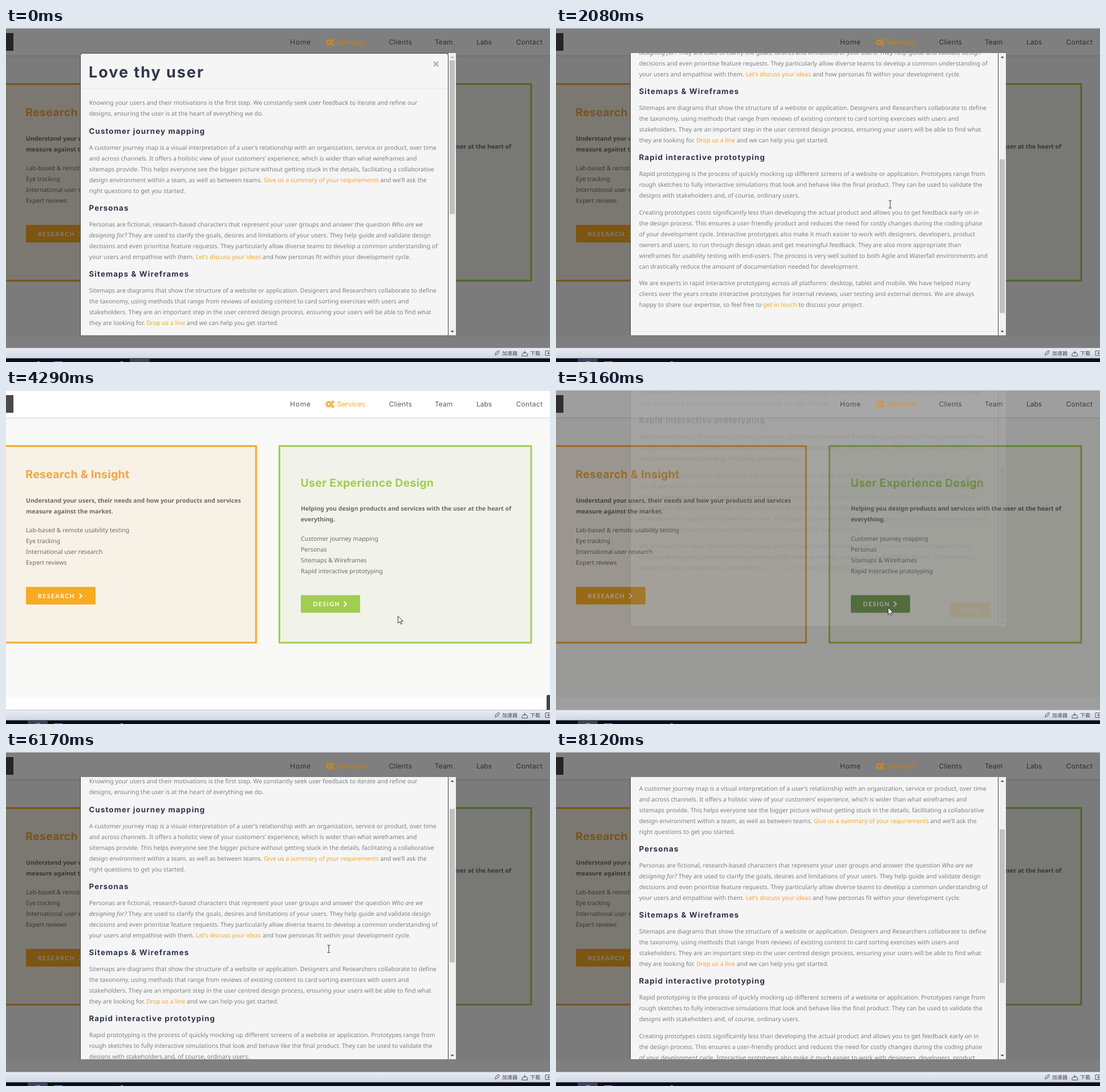
Write an HTML page that moves like this. It is 954 px wide and 587 px high and loops after 8.52 s.

```html
<!DOCTYPE html>
<html lang="en">
<head>
<meta charset="utf-8">
<title>Love thy user</title>
<style>
html, body { margin: 0; width: 100%; height: 100%; overflow: hidden; background: #f8f8f7; }
svg { display: block; width: 954px; height: 587px; }
text { font: 10.52px "Noto Sans", sans-serif; text-rendering: geometricPrecision; white-space: pre; }
.nav { font: 12px Inter, sans-serif; fill: #5c5c5c; }
.card { font: 700 19.5px Inter, sans-serif; letter-spacing: .28px; }
.copy { fill: #6b6b6b; }
.bold { font-weight: 700; }
.btn { font: 700 10.5px Lato, sans-serif; letter-spacing: 1.45px; fill: #fff; }
.h1 { font: 700 27px Inter, sans-serif; letter-spacing: 1.95px; fill: #30374a; }
.h2 { font: 700 13.4px Inter, sans-serif; letter-spacing: 1.08px; fill: #2e3548; }
.body { fill: #7a8087; }
.link { fill: #f5a623; }
.em { font-style: italic; }
.tool { font: 9px "Noto Sans CJK SC", "Noto Sans CJK", sans-serif; fill: #444; }
.chev { fill: none; stroke: #fff; stroke-width: 2; }
</style>
</head>
<body>
<svg viewBox="0 0 954 587">
  <defs>
    <clipPath id="view"><rect y="1" width="954" height="561"/></clipPath>
    <clipPath id="pane"><rect x="130" y="44" width="659" height="496"/></clipPath>
    <linearGradient id="bar" x2="0" y2="1">
      <stop stop-color="#e9edf4"/><stop offset="1" stop-color="#d0d7e4"/>
    </linearGradient>
  </defs>
  <rect width="954" height="587" fill="#cfd5e3"/>
  <g clip-path="url(#view)">
    <rect y="1" width="954" height="561" fill="#f8f8f7"/>
    <rect y="541" width="954" height="21" fill="#fff"/>
    <rect y="48" width="954" height="3" fill="#000" opacity=".035"/>
    <rect y="1" width="954" height="47" fill="#fff"/>
    <rect y="48" width="954" height="1" fill="#e2e2e2"/>
    <rect x="-18" y="9" width="31" height="31" fill="#4a4a4a"/>
    <rect x="-6" y="98.5" width="444.5" height="345.5" fill="#f8f1e6" stroke="#f5a833" stroke-width="3"/>
    <rect x="479.5" y="98.5" width="441.5" height="345.5" fill="#f1f3ea" stroke="#a0ce4e" stroke-width="3"/>
    <rect x="35" y="346" width="122" height="31" rx="1.5" fill="#f7ab23"/>
    <rect id="design" x="517" y="360.5" width="104" height="31" rx="1.5"/>
    <path class="chev" d="M128.5 357.5l4.3 4.3-4.3 4.3M592.5 372l4.3 4.3-4.3 4.3"/>
    <g id="page"></g>
    <g id="active">
      <g fill="none" stroke="#f5a833">
        <circle cx="566" cy="25" r="3.4" stroke-width="2.6"/>
        <circle cx="566" cy="25" r="5.2" stroke-width="1.6" stroke-dasharray="2.1 1.98"/>
        <circle cx="573" cy="21.3" r="1.8" stroke-width="1.8"/>
        <circle cx="573" cy="28.7" r="1.8" stroke-width="1.8"/>
      </g>
    </g>
    <path id="top" d="M954 536h-4q-2 0-2 2v24h6z" fill="#444"/>
    <rect id="shade" y="1" width="954" height="561"/>
    <use id="glow" href="#active" opacity=".65"/>
    <g id="modal">
      <g clip-path="url(#pane)">
        <g id="content">
          <rect x="130.5" y="44.5" width="645" height="866" rx="4" fill="#f5f5f5" stroke="#454545"/>
          <path d="M131 106.5h644M131 854.5h644" stroke="#e6e6e6"/>
          <path d="M750.3 59.3l8 8m0-8l-8 8" stroke="#b5b5b5" stroke-width="2.8"/>
          <rect x="690.5" y="868" width="70.5" height="28" rx="1.5" fill="#f7ab23"/>
        </g>
        <rect x="776" y="44" width="13" height="496" fill="#f1f1f1"/>
        <rect id="thumb" x="778" y="57" width="9" height="270" fill="#c1c1c1"/>
        <path id="up" d="M779.7 52.5h6l-3-3z"/>
        <path d="M779.7 532h6l-3 3z" fill="#404040"/>
      </g>
    </g>
  </g>
  <rect y="562" width="954" height="18.5" fill="url(#bar)"/>
  <rect y="562" width="954" height="1" fill="#b9bfce"/>
  <g fill="none" stroke="#555">
    <path d="M858 573q1-5 7-6q0 6-5 7zM857 576l3-3M861 570l2 2"/>
    <path d="M905 573v3.500h9.500v-3.500l-2-2h-5.500zM909.700 567v5m-2-2l2 2 2-2"/>
    <path d="M954 567.500h-8v8h8M949 571.500h5m-2.500-2.500v5"/>
  </g>
  <text class="tool" x="870" y="575">加速器</text>
  <text class="tool" x="919" y="575">下载</text>
  <rect y="580.5" width="954" height="6.500" fill="#090d18"/>
  <rect id="task" y="580.5" width="35" height="6.500" fill="#3d4150"/>
  <ellipse id="dot" cx="56" cy="588" rx="6" ry="3" fill="#6b55a8"/>
  <rect x="84" y="586" width="15" height="1" fill="#d98a1f"/>
  <path d="M55 586.500h4M201 586.500h4" stroke="#bbb"/>
  <g id="cursor" stroke-linejoin="round">
    <path id="arrow" d="M.5 .5v12.200l2.900-2.700 2 4.500 2-.9-2-4.300h3.900z" fill="#fff" stroke="#222" stroke-width=".9"/>
    <path id="beam" d="M-2.500 -6.500h2l.5.500.5-.5h2M0-6v12M-2.500 6.500h2l.5-.5.5.5h2" fill="none" stroke="#333"/>
    <path id="hand" d="M-1 8V1q1-2 2 0v5l5 1q2 .5 2 2.500v3l-1.500 4h-6l-4.500-6.500q0-2 1.500-1z" fill="#fff" stroke="#222" stroke-width=".9"/>
  </g>
</svg>
<script>
const LOOP = 8520, MAX = 371, SLIDE = 124;
const $ = id => document.getElementById(id);
const set = (id, k, v) => $(id).setAttribute(k, v);
const show = (id, on) => set(id, 'visibility', on ? 'visible' : 'hidden');
const clamp = p => Math.min(1, Math.max(0, p));

// *link* and _emphasis_ become spans
function put(box, cls, x, y, str, color) {
  const node = (name, c, s) => {
    const n = document.createElementNS('http://www.w3.org/2000/svg', name);
    if (c) n.setAttribute('class', c);
    n.textContent = s;
    return n;
  };
  const el = node('text', cls, '');
  el.setAttribute('x', x);
  el.setAttribute('y', y);
  if (color) el.style.fill = color;
  for (const part of str.split(/(\*[^*]+\*|_[^_]+_)/)) {
    if (!part) continue;
    const c = part[0] === '*' ? 'link' : part[0] === '_' ? 'em' : '';
    el.append(c ? node('tspan', c, part.slice(1, -1)) : part);
  }
  $(box).append(el);
  return el;
}
const rows = (box, cls, x, y, str) =>
  str.split('\n').forEach((s, i) => put(box, cls, x, y + i * 19, s));

const nav = (box, x, label, gap, color) =>
  put(box, 'nav', x, 29.3, label, color).style.letterSpacing = gap + 'px';
nav('page', 498, 'Home', .8);
nav('active', 580.5, 'Services', 0, '#f5a833');
nav('page', 671.5, 'Clients', .25);
nav('page', 752, 'Team', 0);
nav('page', 825, 'Labs', 0);
nav('page', 894.5, 'Contact', .3);

put('page', 'card', 34.3, 155, 'Research & Insight', '#f0a93a');
put('page', 'card', 516.5, 169.7, 'User Experience Design', '#a0ce4e');
put('page', 'btn', 56, 365.8, 'RESEARCH');
put('page', 'btn', 538.5, 380.3, 'DESIGN');
rows('page', 'copy bold', 35, 197.5, `Understand your users, their needs and how your products and services
measure against the market.`);
rows('page', 'copy', 35, 250, `Lab-based & remote usability testing
Eye tracking
International user research
Expert reviews`);
rows('page', 'copy bold', 517, 212, `Helping you design products and services with the user at the heart of
everything.`);
rows('page', 'copy', 517, 264.7, `Customer journey mapping
Personas
Sitemaps & Wireframes
Rapid interactive prototyping`);

const para = (y, str) => rows('content', 'body', 145.7, y, str);
const head = (y, str) => put('content', 'h2', 145.5, y, str);
put('content', 'h1', 145, 87, 'Love thy user');
para(135.3, `Knowing your users and their motivations is the first step. We constantly seek user feedback to iterate and refine our
designs, ensuring the user is at the heart of everything we do.`);
head(185.5, 'Customer journey mapping');
para(213.7, `A customer journey map is a visual interpretation of a user’s relationship with an organization, service or product, over time
and across channels. It offers a holistic view of your customers’ experience, which is wider than what wireframes and
sitemaps provide. This helps everyone see the bigger picture without getting stuck in the details, facilitating a collaborative
design environment within a team, as well as between teams. *Give us a summary of your requirements* and we’ll ask the
right questions to get you started.`);
head(320.5, 'Personas');
para(348.7, `Personas are fictional, research-based characters that represent your user groups and answer the question _Who are we_
_designing for?_ They are used to clarify the goals, desires and limitations of your users. They help guide and validate design
decisions and even prioritise feature requests. They particularly allow diverse teams to develop a common understanding of
your users and empathise with them. *Let’s discuss your ideas* and how personas fit within your development cycle.`);
head(437, 'Sitemaps & Wireframes');
para(465, `Sitemaps are diagrams that show the structure of a website or application. Designers and Researchers collaborate to define
the taxonomy, using methods that range from reviews of existing content to card sorting exercises with users and
stakeholders. They are an important step in the user centred design process, ensuring your users will be able to find what
they are looking for. *Drop us a line* and we can help you get started.`);
head(553.3, 'Rapid interactive prototyping');
para(581.3, `Rapid prototyping is the process of quickly mocking up different screens of a website or application. Prototypes range from
rough sketches to fully interactive simulations that look and behave like the final product. They can be used to validate the
designs with stakeholders and, of course, ordinary users.`);
para(648.7, `Creating prototypes costs significantly less than developing the actual product and allows you to get feedback early on in
the design process. This ensures a user-friendly product and reduces the need for costly changes during the coding phase
of your development cycle. Interactive prototypes also make it much easier to work with designers, developers, product
owners and users, to run through design ideas and get meaningful feedback. They are also more appropriate than
wireframes for usability testing with end-users. The process is very well suited to both Agile and Waterfall environments and
can drastically reduce the amount of documentation needed for development.`);
para(773, `We are experts in rapid interactive prototyping across all platforms: desktop, tablet and mobile. We have helped many
clients over the years create interactive prototypes for internal reviews, user testing and external demos. We are always
happy to share our expertise, so feel free to *get in touch* to discuss your project.`);
put('content', 'btn', 706.7, 885.8, 'CLOSE').style.letterSpacing = '1px';

// bursts of motion: start, end, number of picture changes
const bursts = [[70, 500, 7], [820, 920, 2], [1230, 1760, 8], [1910, 2240, 5], [2850, 3420, 8],
  [3570, 3570, 1], [3740, 4510, 11], [4600, 4760, 3], [4910, 5760, 11], [5840, 6250, 6],
  [6390, 6620, 4], [6760, 7550, 11], [7630, 8120, 7]];
const scroll = [[1150, 0], [1400, 75], [1760, 225], [1840, 225], [2075, 321], [2240, MAX],
  [5770, MAX], [6168, 80], [6250, 71], [6310, 71], [6620, 146], [6680, 146], [7000, 221],
  [7080, 221], [7400, 146]];
const pointer = [[70, 790, 516], [300, 650, 370], [500, 586, 310], [2780, 586, 310], [3180, 690, 500],
  [3260, 706, 532], [3420, 717, 508], [3740, 717, 507], [3894, 712, 500], [4279, 687, 397],
  [4510, 625, 388], [4760, 582, 382], [5250, 582, 382], [5760, 566, 346], [7080, 566, 346],
  [7550, 772, 475], [7630, 780, 480], [8120, 937, 590]];
const kinds = [[0, 'arrow'], [140, 'beam'], [3150, 'arrow'], [3330, 'hand'], [3800, 'arrow'],
  [4590, 'hand'], [4990, 'arrow'], [5440, 'beam'], [7530, 'arrow']];

function snap(t) {
  let at = 0;
  for (const [a, b, n] of bursts) {
    if (t < a) break;
    const step = (b - a) / (n - 1) || 1;
    at = Math.min(b, a + step * Math.floor((t - a) / step + .1));
  }
  return at;
}
function track(keys, t, c = 1) {
  if (t <= keys[0][0]) return keys[0][c];
  for (let i = 1; i < keys.length; i++) {
    const a = keys[i - 1], b = keys[i];
    if (t <= b[0]) return a[c] + (b[c] - a[c]) * (t - a[0]) / (b[0] - a[0]);
  }
  return keys[keys.length - 1][c];
}
const easeOut = p => 1 - Math.pow(1 - clamp(p), 1.68);

function draw(clock) {
  const t = snap(clock);
  const y = Math.round(track(scroll, t));
  const opening = t > 4800;
  const fade = clamp(opening ? (t - 5135) / 300 : 1 - (t - 3740) / 300);
  const lift = opening ? 1 - easeOut((t - 5165) / 300) : easeOut((t - 3740) / 300);
  const shade = .5 * clamp(opening ? (t - 4950) / 283 : 1 - (t - 4050) / 150);

  set('content', 'transform', `translate(0 ${-y})`);
  set('thumb', 'y', Math.round(57 + y * .541));
  set('up', 'fill', y < 1 ? '#a3a3a3' : '#404040');
  set('modal', 'opacity', fade);
  set('modal', 'transform', `translate(0 ${-Math.round(SLIDE * lift)})`);
  show('modal', fade > 0);
  set('shade', 'opacity', shade);
  show('glow', t < 3740 || t > 4950);
  show('top', t > 4200 && t < 4950);
  set('design', 'fill', t < 4600 ? '#a0ce4e' : '#659640');
  set('task', 'x', t < 820 ? 217 : 38);
  show('dot', t >= 820);

  const on = t >= 70 && t < 8120;
  const kind = kinds.filter(k => k[0] <= t).pop()[1];
  for (const k of ['arrow', 'beam', 'hand']) show(k, on && k === kind);
  set('cursor', 'transform', `translate(${track(pointer, t)} ${track(pointer, t, 2)})`);
}

const start = performance.now();
function tick() {
  draw((performance.now() - start) % LOOP);
  requestAnimationFrame(tick);
}
tick();
</script>
</body>
</html>
```
